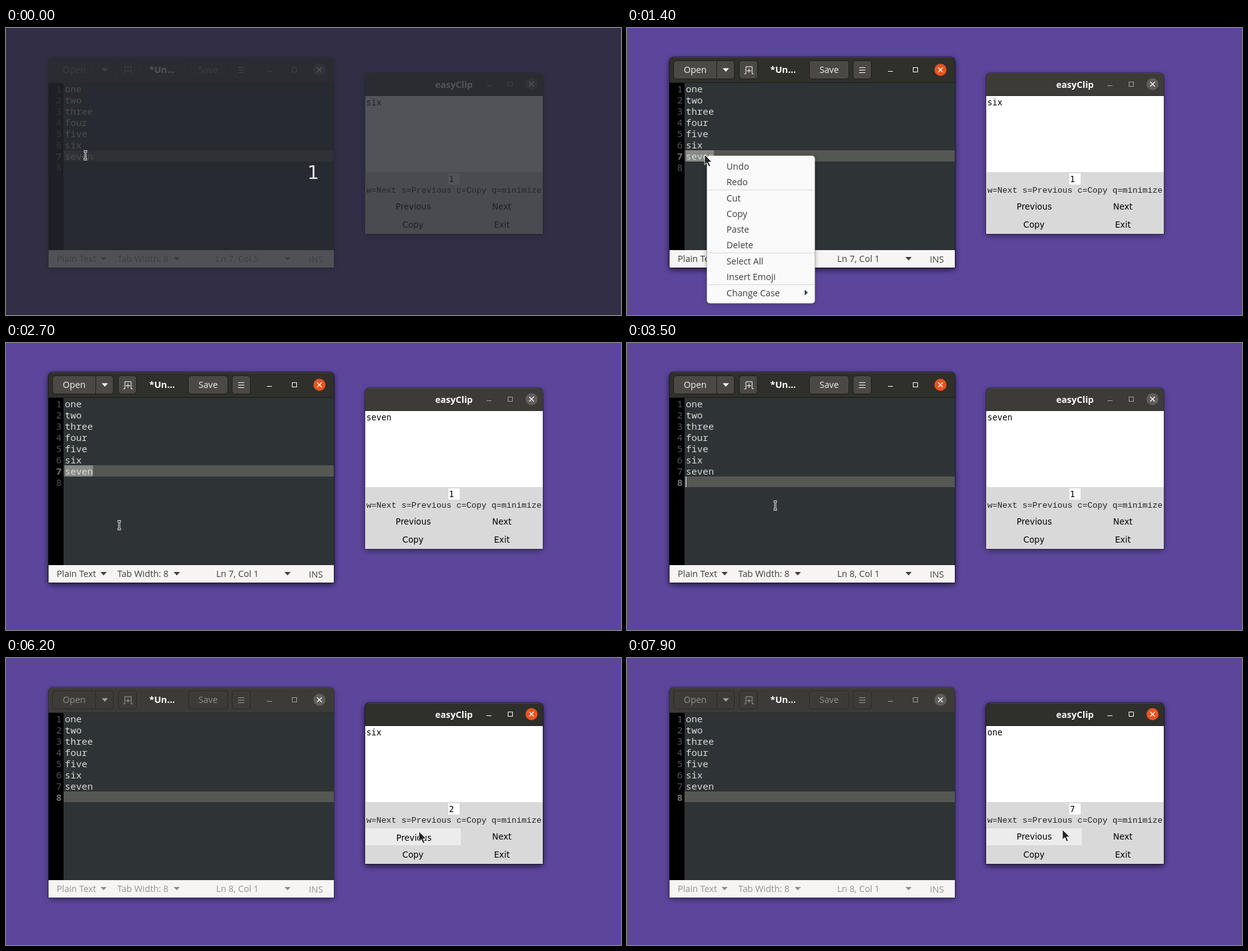
Animation of 983 by 460 pixels, one loop 8000 ms. Source, as an HTML page:

```html
<!DOCTYPE html>
<html lang="en">
<head>
<meta charset="utf-8">
<title>Clipboard manager demo</title>
<style>
html, body { margin: 0; width: 100%; height: 100%; overflow: hidden; background: #5c469c; }
svg { display: block; }
text { white-space: pre; }
.ui { font: 14.2px "Open Sans", "Noto Sans", sans-serif; }
.title { font: bold 14.5px "Open Sans", "Noto Sans", sans-serif; }
.code { font: 15px "Noto Sans Mono", monospace; }
.clip { font: 13.3px "DejaVu Sans Mono", monospace; }
.hint { font: 13.33px "Liberation Mono", "Courier New", monospace; }
.tk { font: 13.33px "DejaVu Sans", sans-serif; }
.count { font: 30px "DejaVu Sans", sans-serif; }
</style>
</head>
<body>
<svg id="stage" width="983" height="460" viewBox="0 0 983 460">
  <defs><filter id="blur" x="-10%" y="-15%" width="120%" height="130%"><feGaussianBlur stdDeviation="4.5"/></filter></defs>
</svg>
<script>
const LOOP = 8000, STEP = 100;
const stage = document.getElementById('stage');

function el(parent, tag, attrs = {}, content) {
  const node = document.createElementNS('http://www.w3.org/2000/svg', tag);
  for (const key in attrs) node.setAttribute(key, attrs[key]);
  if (content !== undefined) node.textContent = content;
  parent.appendChild(node);
  return node;
}
const group = parent => el(parent, 'g');
const rect = (p, x, y, width, height, fill, more) => el(p, 'rect', { x, y, width, height, fill, ...more });
const path = (p, d, more) => el(p, 'path', { d, ...more });
const line = (p, d, stroke, width = 1) => path(p, d, { stroke, fill: 'none', 'stroke-width': width });
const label = (p, cls, x, y, fill, str, more) => el(p, 'text', { class: cls, x, y, fill, ...more }, str);
const triangle = (p, x, y, fill) => path(p, `M${x - 5} ${y - 2.5}h10l-5 5.5z`, { fill });
const show = (node, on) => node.setAttribute('visibility', on ? 'visible' : 'hidden');
const move = (node, x, y) => node.setAttribute('transform', `translate(${x} ${y})`);
const middle = { 'text-anchor': 'middle' };

const themes = [
  { bar: '#3d3b38', edge: '#2b2a28', button: '#3d3b38', text: '#918f8c', icon: '#a3a19e',
    close: '#5f5e5c', status: '#929292', shadow: 0.36 },
  { bar: '#2f2f2b', edge: '#1e1e1b', button: '#4a4945', text: '#f2f1ef', icon: '#ffffff',
    close: '#e95420', status: '#3d3d3d', shadow: 0.3 }
];

function frame(p, th, x, y, w, h, bar) {
  rect(p, x - 1, y + 2, w + 2, h + 2, '#000', { rx: 7, opacity: th.shadow, filter: 'url(#blur)' });
  path(p, `M${x - 0.5} ${y + h + 0.5}v${7 - h}q0 -8 8 -8h${w - 15}q8 0 8 8v${h - 7}z`,
    { fill: 'none', stroke: '#000', 'stroke-opacity': 0.3 });
  path(p, `M${x} ${y + bar}v${7 - bar}q0 -7 7 -7h${w - 14}q7 0 7 7v${bar - 7}z`, { fill: th.bar });
  line(p, `M${x + 6} ${y + 0.5}h${w - 12}`, '#4a4844');
  line(p, `M${x} ${y + bar - 0.5}h${w}`, th.edge);
}

function controls(p, th, x, y, gap) {
  line(p, `M${x - 2 * gap - 4} ${y + 2.5}h8`, th.icon);
  rect(p, x - gap - 3.5, y - 3.5, 7, 7, 'none', { stroke: th.icon });
  el(p, 'circle', { cx: x, cy: y, r: 9.7, fill: th.close });
  line(p, `M${x - 3.7} ${y - 3.7}l7.4 7.4m0 -7.4l-7.4 7.4`, '#fff', 1.3);
}

// Editor window
const statusTexts = [];
function editorChrome(th) {
  const g = group(stage);
  frame(g, th, 68, 47, 456, 337, 41);
  for (const [x, w] of [[74.5, 97], [179.5, 29], [291.5, 63], [361.5, 29]])
    rect(g, x, 52.5, w, 29, th.button, { rx: 4, stroke: th.edge });
  line(g, 'M143.5 53v28', th.edge);
  label(g, 'ui', 109, 72, th.text, 'Open', middle);
  triangle(g, 158, 67, th.icon);
  line(g, 'M187.5 73.5h2.5v-11.5h10v11.5h2.5M195 65v7m-3.5 -3.5h7', th.icon);
  label(g, 'title', 229, 72, '#fff', '*Un…');
  label(g, 'ui', 323, 72, th.text, 'Save', middle);
  line(g, 'M371 63.5h10m-10 4h10m-10 4h10', th.icon);
  controls(g, th, 501, 67, 40);
  rect(g, 68, 356, 456, 28, '#f6f5f4');
  label(g, 'ui', 81, 375, th.status, 'Plain Text');
  label(g, 'ui', 178, 375, th.status, 'Tab Width: 8');
  statusTexts.push(label(g, 'ui', 336, 375, th.status, ''));
  label(g, 'ui', 484, 376, th.status, 'INS');
  for (const x of [156, 273, 450]) triangle(g, x, 369.5, th.status);
  return g;
}
const editorFocus = themes.map(editorChrome)[1];

const WORDS = ['one', 'two', 'three', 'four', 'five', 'six', 'seven'];
const rowBase = i => 103 + 17.93 * i;
rect(stage, 68, 88, 456, 268, '#2e3436');
rect(stage, 68, 88, 24, 268, '#000');
const activeRow = rect(stage, 92, 196, 432, 18, '#555753');
const selection = rect(stage, 94, 196, 0, 18, '#888a85');
const numbers = [];
for (let i = 0; i < 8; i++) {
  numbers.push(label(stage, 'code', 89, rowBase(i), '#5a525b', i + 1, { 'text-anchor': 'end' }));
  if (WORDS[i]) label(stage, 'code', 94, rowBase(i), '#d8dbd4', WORDS[i]);
}
const caret = rect(stage, 94, 214, 1, 17, '#eeeeec');

// Clipboard window
function clipChrome(th) {
  const g = group(stage);
  frame(g, th, 574, 72, 284, 258, 37);
  label(g, 'title', 716, 96, '#fff', 'easyClip', middle);
  controls(g, th, 840, 90, 34);
  return g;
}
const clipFocus = themes.map(clipChrome)[1];
rect(stage, 574, 109, 284, 221, '#d9d9d9');
rect(stage, 575, 109, 283, 122, '#fff');
rect(stage, 707, 233, 18, 18, '#fff');
const clipText = label(stage, 'clip', 576, 123.5, '#000', '');
const clipIndex = label(stage, 'clip', 708, 247, '#000', '');
label(stage, 'hint', 576, 264, '#222', 'w=Next s=Previous c=Copy q=minimize');
const hover = rect(stage, 575, 273, 152, 27, '#ececec');
const previous = label(stage, 'tk', 651, 291, '#000', 'Previous', middle);
label(stage, 'tk', 792.5, 291, '#000', 'Next', middle);
label(stage, 'tk', 650.5, 320, '#000', 'Copy', middle);
label(stage, 'tk', 792.5, 320, '#000', 'Exit', middle);

// Context menu
const menu = group(stage);
rect(menu, 128, 207, 172, 235, '#000', { rx: 5, opacity: 0.35, filter: 'url(#blur)' });
rect(menu, 127.5, 204.5, 173, 237, '#fafafa', { rx: 5, stroke: '#000', 'stroke-opacity': 0.22 });
const menuHover = rect(menu, 128, 0, 172, 25, '#dcdcdc');
for (const y of [259.5, 360.5, 411.5]) line(menu, `M128 ${y}h172`, '#d8d8d8');
const ITEMS = { Undo: 222, Redo: 247, Cut: 273, Copy: 298, Paste: 323, Delete: 348,
  'Select All': 374, 'Insert Emoji': 399, 'Change Case': 425 };
for (const name in ITEMS) label(menu, 'ui', 159, ITEMS[name] + 5, '#3d3d3d', name);
path(menu, 'M284 419.5v9l5 -4.5z', { fill: '#3d3d3d' });

// Countdown veil
const veil = group(stage);
rect(veil, 0, 0, 983, 460, 'rgb(39,40,48)', { opacity: 0.8 });
label(veil, 'count', 491, 242, '#dcdcdc', '1', middle);

// Pointers
const arrow = path(stage, 'M0 0v16.2l3.8 -3.5l2.9 6.6l2.7 -1.2l-2.9 -6.3h5.2z',
  { fill: '#222', stroke: '#fff', 'stroke-width': 0.9 });
const beam = group(stage);
const beamPath = 'M-3 -6.5h2.2l.8 .8l.8 -.8h2.2M0 -6v12M-3 6.5h2.2l.8 -.8l.8 .8h2.2';
line(beam, beamPath, '#fff', 3);
line(beam, beamPath, '#111', 1.1);

// Timelines: each entry holds until the next one
const POINTER = [
  [0, 127, 204, 'I'], [500, 140, 204, 'I'], [600, 134, 204, 'I'], [700, 118, 204, 'I'],
  [800, 104, 203, 'I'], [900, 99, 203, 'I'], [1400, 124, 203], [1800, 141, 238],
  [1900, 160, 264], [2100, 180, 291], [2200, 181, 306], [2500, 181, 292, 'I'],
  [3100, 207, 276, 'I'], [3200, 237, 260.5, 'I'], [4700, 290, 265, 'I'], [4800, 420, 272, 'I'],
  [4900, 600, 280], [5000, 718, 303], [5100, 666, 301], [5300, 663, 291], [5400, 660, 283],
  [5800, 660, 278], [6400, 656, 277], [7900, 696, 275]
];
const SELECT = [[0, 5], [600, 4], [700, 3], [800, 1], [900, 0]];
const CLIPS = [[0, 1, 'six'], [2500, 1, 'seven'], [6100, 2, 'six'], [6400, 3, 'five'],
  [6600, 4, 'four'], [6800, 5, 'three'], [7000, 6, 'two'], [7400, 7, 'one']];
const PRESSED = [[0, 0], [5800, 1], [6100, 0], [6200, 1], [6400, 0], [6500, 1], [6600, 0],
  [6700, 1], [7000, 0], [7200, 1], [7400, 0]];
const MENU_ROW = [[0, ''], [1800, 'Redo'], [1900, 'Cut'], [2100, 'Copy']];

const at = (list, t) => list.filter(e => e[0] <= t).pop();
const ease = u => { u = Math.min(1, Math.max(0, u)); return u * (2 - u); };

function draw(t) {
  show(veil, t < 100);
  const away = ease((t - 5700) / 400);
  editorFocus.setAttribute('opacity', ease((t - 400) / 300) * (1 - away));
  clipFocus.setAttribute('opacity', away);

  // Editor
  const row = t < 3500 ? 6 : 7;
  const start = at(SELECT, t)[1];
  const col = row === 7 ? 1 : t < 500 ? 5 : start + 1;
  for (const s of statusTexts) s.textContent = `Ln ${row + 1}, Col ${col}`;
  activeRow.setAttribute('y', row === 6 ? 196 : 214);
  activeRow.setAttribute('height', row === 6 ? 18 : 17);
  numbers.forEach((n, i) => {
    n.style.fontWeight = i === row ? 'bold' : 'normal';
    n.setAttribute('fill', i === row ? '#777078' : '#5a525b');
  });
  selection.setAttribute('x', 94 + 9 * start);
  selection.setAttribute('width', 9 * (5 - start));
  show(selection, row === 6 && t >= 500);
  show(caret, t >= 3500 && t < 5900 && (t - 3500) % 1150 < 700);

  // Menu
  const item = at(MENU_ROW, t)[1], menuOpen = t >= 1400 && t < 2500;
  show(menu, menuOpen);
  show(menuHover, menuOpen && item);
  if (item) menuHover.setAttribute('y', ITEMS[item] - 13);

  // Clipboard
  const [, index, word] = at(CLIPS, t);
  clipText.textContent = word;
  clipIndex.textContent = index;
  const down = at(PRESSED, t)[1];
  move(previous, down, 2 * down);

  // Pointer
  const [, x, y, kind] = at(POINTER, t);
  show(beam, kind);
  show(arrow, !kind);
  move(kind ? beam : arrow, x, y);
  const over = !kind && x > 574 && x < 727 && y > 272;
  show(hover, over);
  hover.setAttribute('y', y < 300 ? 273 : 302);
}

function tick() {
  draw(Math.floor(performance.now() % LOOP / STEP) * STEP);
  requestAnimationFrame(tick);
}
tick();
</script>
</body>
</html>
```
